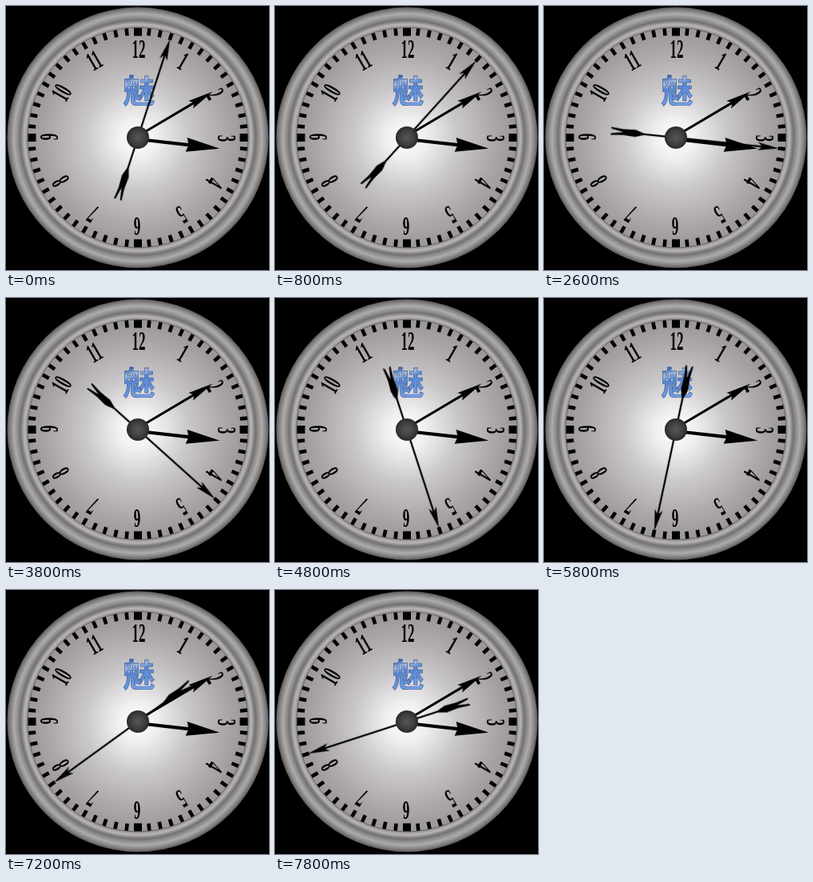
An HTML page for the animation above (8 s loop, 329 by 331 pixels).

```html
<!DOCTYPE html>
<html lang="ja">
<head>
<meta charset="utf-8">
<title>Clock</title>
<style>
  html, body { margin: 0; width: 100%; height: 100%; overflow: hidden; background: #000; }
  svg { display: block; width: 100%; height: 100%; }
  .numeral { font: bold 34px "Liberation Serif", serif; text-anchor: middle; }
  .sign { font: 900 40px "Noto Sans CJK JP", "Noto Sans CJK", sans-serif; text-anchor: middle; }
  .second { animation: sweep 8s steps(40, end) infinite; }
  @keyframes sweep {
    from { transform: rotate(18deg); }
    to { transform: rotate(258deg); }
  }
</style>
</head>
<body>
<svg viewBox="0 0 329 331">
  <defs>
    <radialGradient id="rim" gradientUnits="userSpaceOnUse" cx="0" cy="0" r="164">
      <stop offset=".835" stop-color="#868285"/>
      <stop offset=".85" stop-color="#a09c9f"/>
      <stop offset=".867" stop-color="#b9b6b8"/>
      <stop offset=".88" stop-color="#979496"/>
      <stop offset=".897" stop-color="#737072"/>
      <stop offset=".925" stop-color="#989597"/>
      <stop offset=".945" stop-color="#aeabad"/>
      <stop offset=".975" stop-color="#848183"/>
      <stop offset="1" stop-color="#555254"/>
    </radialGradient>
    <radialGradient id="face" gradientUnits="userSpaceOnUse" cx="-1" cy="1" r="140">
      <stop offset="0" stop-color="#fff"/>
      <stop offset=".18" stop-color="#f0eff0"/>
      <stop offset=".46" stop-color="#cbc8ca"/>
      <stop offset=".78" stop-color="#aba7aa"/>
      <stop offset="1" stop-color="#989497"/>
    </radialGradient>
    <radialGradient id="hub">
      <stop offset="0" stop-color="#565656"/>
      <stop offset=".6" stop-color="#414141"/>
      <stop offset="1" stop-color="#292929"/>
    </radialGradient>
    <linearGradient id="sky" x1="0" y1="0" x2=".2" y2="1">
      <stop offset=".15" stop-color="#294679"/>
      <stop offset=".3" stop-color="#4a72b4"/>
      <stop offset=".4" stop-color="#a4bce2"/>
      <stop offset=".52" stop-color="#5684cf"/>
      <stop offset="1" stop-color="#7aa4e8"/>
    </linearGradient>
  </defs>

  <g transform="translate(165 165)">
    <circle r="163.5" fill="url(#rim)"/>
    <circle r="138" fill="url(#face)" stroke="#5d5a5c" stroke-width=".8"/>
    <g id="dial"></g>
    <text class="sign" x="1.5" y="-44.5" fill="url(#sky)" stroke="#345793" stroke-width=".6">魅</text>

    <g transform="translate(0 -2) rotate(59.3)">
      <path d="M0 0V-86" stroke="#000" stroke-width="3"/>
      <path d="M0-109L5.5-77L0-82L-5.5-77Z"/>
    </g>
    <g transform="translate(0 2) rotate(96.5)">
      <path d="M0 0V-68" stroke="#000" stroke-width="4.2"/>
      <path d="M0-103L9-61L0-64L-9-61Z"/>
    </g>
    <g class="second">
      <path d="M0 42V-112" stroke="#000" stroke-width="2.3"/>
      <path d="M0-130L5-103L0-109L-5-103Z"/>
      <path d="M0 37L4.5 51L3.7 66L5 82L2.8 81L0 66L-2.8 81L-5 82L-3.7 66L-4.5 51Z"/>
    </g>
    <circle r="14" fill="url(#hub)"/>
  </g>
</svg>
<script>
  const dial = document.getElementById('dial');

  function add(tag, attributes, text = '') {
    const node = document.createElementNS('http://www.w3.org/2000/svg', tag);
    for (const [name, value] of Object.entries(attributes)) node.setAttribute(name, value);
    node.textContent = text;
    dial.append(node);
  }

  for (let minute = 0; minute < 60; minute++) {
    const width = minute % 15 ? 4.6 : 10;
    add('rect', {
      x: -width / 2, y: -137.5, width, height: width === 10 ? 10 : 9,
      transform: `rotate(${minute * 6})`
    });
  }

  // Condensed numerals, each standing on the line to the centre.
  for (let hour = 1; hour <= 12; hour++) {
    add('text', {
      class: 'numeral',
      transform: `rotate(${hour * 30}) translate(1 -100) scale(.5 1)`
    }, hour);
  }
</script>
</body>
</html>
```
